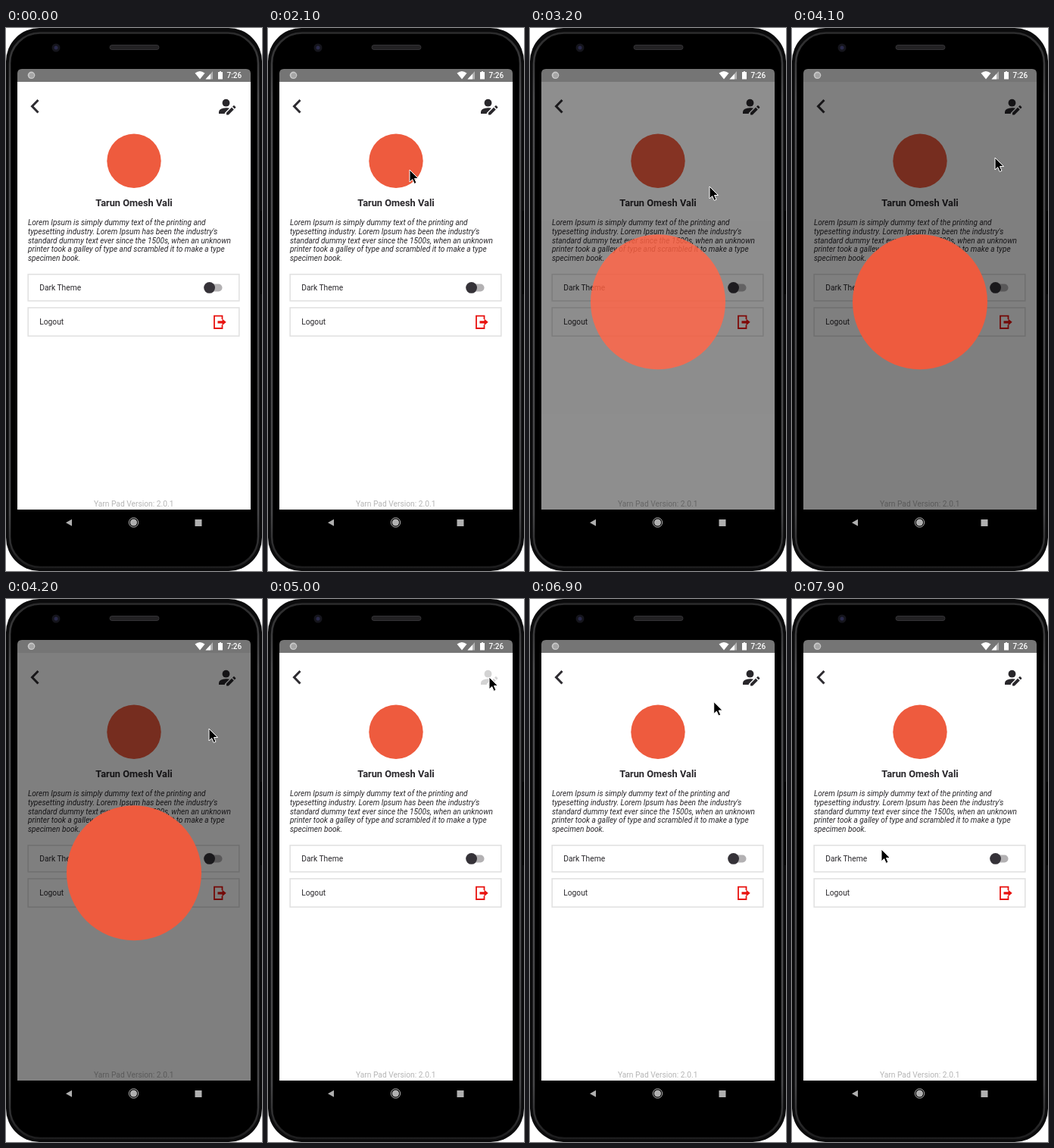
Write an HTML page that moves like this. It is 338x716 px and loops after 8 s.

```html
<!DOCTYPE html>
<html lang="en">
<head>
<meta charset="utf-8">
<title>Profile screen</title>
<style>
  html, body { margin: 0; width: 100%; height: 100%; overflow: hidden; background: #fff; }
  svg { display: block; width: 338px; height: 716px; font-family: Roboto, sans-serif; font-size: 10.25px; fill: #29272b; }
  .line { fill: none; stroke: #2e2c31; stroke-width: 3; }
  .card { fill: none; stroke: #e2e2e2; stroke-width: 1.6; }
  .mid { text-anchor: middle; }
</style>
</head>
<body>
<svg viewBox="0 0 338 716">
  <defs>
    <linearGradient id="rim" x2="0" y2="1">
      <stop offset="0" stop-color="#2b2b2c"/>
      <stop offset=".12" stop-color="#4c4c4e"/>
      <stop offset=".9" stop-color="#464648"/>
      <stop offset="1" stop-color="#1d1d1e"/>
    </linearGradient>
  </defs>

  <!-- phone -->
  <rect width="338" height="716" rx="44" fill="#0b0b0c"/>
  <rect x="5" y="6.5" width="328" height="704.5" rx="40" fill="#000" stroke="url(#rim)" stroke-width="2.6"/>
  <path d="M337 241V351" stroke="#000" stroke-width="2"/>
  <rect x="137" y="22.5" width="65" height="6" rx="3" fill="#222123" stroke="#333235"/>
  <circle cx="66" cy="26" r="5.5" fill="#15151c"/>
  <circle cx="66" cy="26" r="2.5" fill="#29294a"/>

  <!-- screen -->
  <path d="M15 71V60Q15 54 21 54H317Q323 54 323 60V71Z" fill="#757575"/>
  <rect x="15" y="71" width="308" height="564" fill="#fff"/>
  <circle cx="33.5" cy="62.3" r="4.8" fill="#c9c9c9"/>
  <circle cx="33.8" cy="62.5" r="3.3" fill="#a5a5a5"/>
  <g fill="#fff">
    <path d="M249.5 59.5Q256 54.5 262.5 59.5L256 67.5Z"/>
    <path d="M273 57V67.5H263.5Z" opacity=".45"/>
    <path d="M270 60.5V67.5H263.5Z"/>
    <path d="M280 58H282V57H284V58H286V67.5H280Z"/>
    <text x="291.5" y="66" font-size="10" font-weight="500">7:26</text>
  </g>
  <g fill="#b0b0b0">
    <path d="M79 652.2L87 647.7V656.7Z"/>
    <circle cx="168.5" cy="652" r="4.6"/>
    <circle cx="168.5" cy="652" r="6.2" fill="none" stroke="#b0b0b0"/>
    <rect x="249.5" y="648" width="9" height="9"/>
  </g>

  <!-- header -->
  <path class="line" d="M42.5 95L34.5 103.2L42.5 111.5"/>
  <g id="pen">
    <circle cx="290.5" cy="98.7" r="4.9"/>
    <path d="M281 113V110.5Q281.5 105.5 291 105.3Q293.5 105.3 295 105.8L288.8 112V113Z"/>
    <path d="M291 114.5V111.7L298 104.7L300.8 107.5L293.8 114.5ZM299 103.7L300.3 102.4Q301 101.8 301.6 102.4L303.1 103.9Q303.7 104.5 303.1 105.2L301.8 106.5Z"/>
  </g>
  <g id="edit" class="line">
    <path d="M260 103.8L266.2 110L279.5 96.7"/>
    <path d="M292 97L304 109M304 97L292 109" stroke-width="4"/>
  </g>

  <!-- profile -->
  <g id="body">
    <circle cx="169" cy="175.3" r="35.7" fill="#ee5b3e"/>
    <text class="mid" x="169" y="235.2" font-size="12.8" font-weight="700">Tarun Omesh Vali</text>
    <g id="about" font-size="10.1" font-style="italic"></g>
    <rect class="card" x="29.2" y="324.8" width="278.6" height="35"/>
    <rect class="card" x="29.2" y="368.8" width="278.6" height="37.4"/>
    <text x="44.2" y="346.3">Dark Theme</text>
    <text x="44.2" y="391.3">Logout</text>
    <rect x="264" y="337.6" width="21.5" height="9.8" rx="4.9" fill="#b3b1b3"/>
    <circle cx="268.6" cy="342.4" r="7.4" fill="#353238"/>
    <g fill="#e8120f">
      <path d="M285.5 384V379.6H275V396H285.5V391.6" fill="none" stroke="#e8120f" stroke-width="1.8"/>
      <path d="M279.5 386.2H285.5V383.4L290.7 387.8L285.5 392.2V389.4H279.5Z"/>
    </g>
    <text class="mid" x="168.7" y="631" fill="#b5b5b5">Yarn Pad Version: 2.0.1</text>
  </g>

  <g id="modal">
    <rect x="15" y="71" width="308" height="564" fill-opacity=".5" fill="#000"/>
    <circle cx="169" cy="361.3" r="89" fill="#ee5b3e"/>
  </g>
  <path id="cursor" d="M0 0V16L3.7 12.6L6.2 18.4L9 17.2L6.5 11.5H11.5Z" fill="#000" stroke="#fff"/>
</svg>
<script>
const $ = id => document.getElementById(id);
const LOOP = 8000, STEP = 100;

const about = [
  "Lorem Ipsum is simply dummy text of the printing and",
  "typesetting industry. Lorem Ipsum has been the industry's",
  "standard dummy text ever since the 1500s, when an unknown",
  "printer took a galley of type and scrambled it to make a type",
  "specimen book."
];
$("about").innerHTML = about.map((s, i) => `<text x="29" y="${260.2 + i * 11.65}">${s}</text>`).join("");

// Eased progress from 0 to 1 between two times
function ease(t, start, end) {
  const p = Math.min(1, Math.max(0, (t - start) / (end - start)));
  return p * (2 - p);
}

const entry = { x: 197, y: 718 };
const moves = [
  { start: 500, end: 800, x: 185, y: 534 },    // up from the bottom edge
  { start: 900, end: 2100, x: 187, y: 187 },   // to the avatar
  { start: 2500, end: 3200, x: 237, y: 209 },  // away from it
  { start: 3200, end: 3700, x: 268, y: 171 },  // outside the enlarged avatar
  { start: 4300, end: 4900, x: 292, y: 103 },  // to the pen
  { start: 5200, end: 5800, x: 265, y: 101 },  // to the check mark
  { start: 6800, end: 7500, x: 181, y: 231 },  // back down
  { start: 7700, end: 7900, x: 118, y: 330 }
];

function cursorAt(t) {
  return moves.reduce((pos, m) => {
    const p = ease(t, m.start, m.end);
    return { x: pos.x + (m.x - pos.x) * p, y: pos.y + (m.y - pos.y) * p };
  }, entry);
}

function draw(now) {
  const t = Math.floor(now % LOOP / STEP) * STEP;
  const editing = t >= 5200 && t < 6500;
  const { x, y } = cursorAt(t);
  $("pen").style.display = editing ? "none" : "";
  $("edit").style.display = editing ? "" : "none";
  $("pen").style.opacity = 1 - .8 * (ease(t, 4800, 5000) - ease(t, 5100, 5200));
  $("body").setAttribute("transform", `translate(0 ${editing ? -1 : 0})`);
  $("modal").style.opacity = ease(t, 3000, 3300) - ease(t, 4200, 4500);
  $("cursor").setAttribute("transform", `translate(${x} ${y})`);
  requestAnimationFrame(draw);
}
requestAnimationFrame(draw);
</script>
</body>
</html>
```
